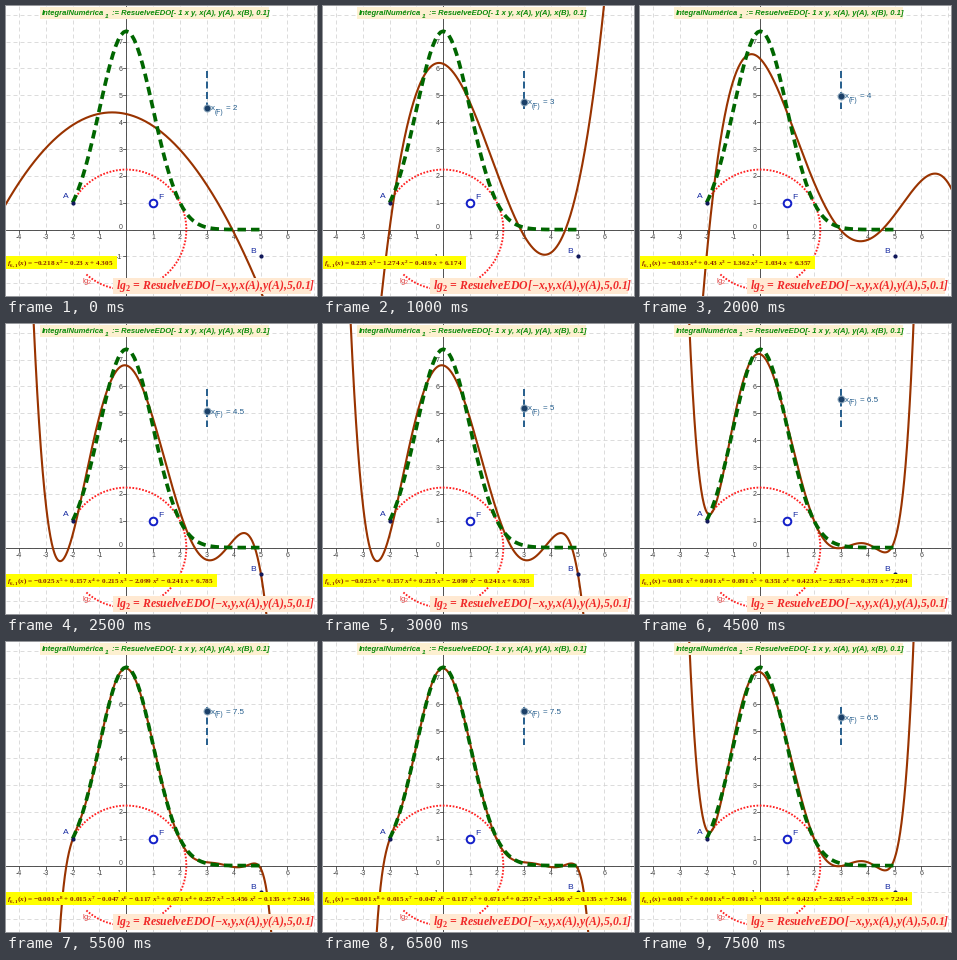
A matplotlib script for the animation above (8000 ms loop, 311 by 290 pixels).

```python
import numpy as np
import matplotlib.pyplot as plt
from matplotlib.animation import FuncAnimation
from matplotlib.patches import Rectangle

W, H, DPI = 311, 290, 100
OX, OY, UNIT = 120.3, 223.6, 26.85
STEP_MS, N_FRAMES = 500, 16

plt.rcParams.update({
    "font.family": "Liberation Sans",
    "mathtext.fontset": "custom",
    "mathtext.bf": "Liberation Serif:bold",
    "mathtext.bfit": "Liberation Serif:italic:bold",
    "lines.dash_capstyle": "butt",
    "lines.scale_dashes": False,
})


def pt(px):
    return px * 72 / DPI


def sx(x):
    return OX + UNIT * np.asarray(x)


def sy(y):
    return OY - UNIT * np.asarray(y)


def dashes(*lengths):
    return (0, tuple(pt(n) for n in lengths))


fig = plt.figure(figsize=(W / DPI, H / DPI), dpi=DPI, facecolor="white")
ax = fig.add_axes([0, 0, 1, 1])
ax.set_xlim(0, W)
ax.set_ylim(H, 0)
ax.axis("off")


def label(x, y, s, size, color, z=6, **kw):
    return ax.text(x, y, s, fontsize=pt(size), color=color, zorder=z,
                   va="baseline", **kw)


def line(x, y, color, width, z, **kw):
    return ax.plot(x, y, color=color, lw=pt(width), zorder=z, **kw)[0]


def dot(x, y, r, color, z=5):
    return ax.plot([x], [y], "o", ms=pt(2 * r), mfc=color, mec="none", zorder=z)[0]


def box(x0, y0, x1, y1, color, z):
    rect = Rectangle((x0, y0), x1 - x0, y1 - y0, fc=color, ec="none", zorder=z)
    return ax.add_patch(rect)


# Grid, axes and tick labels
GRID, AXIS = "#d4d4d4", "#444444"
for k in range(-4, 8):
    line([sx(k)] * 2, [0, H], GRID, 0.8, 0, ls=dashes(4, 3))
for k in range(-2, 9):
    line([0, W], [sy(k)] * 2, GRID, 0.8, 0, ls=dashes(4, 3))
line([0, W], [OY, OY], AXIS, 0.9, 1)
line([OX, OX], [0, H], AXIS, 0.9, 1)
for k in range(-4, 7):
    if k:
        line([sx(k)] * 2, [OY, OY + 3], AXIS, 0.8, 1)
        label(sx(k), OY + 9, str(k), 7, AXIS, 1, ha="center")
for k in range(-2, 8):
    if k:
        line([OX - 3, OX], [sy(k)] * 2, AXIS, 0.8, 1)
        label(OX - 4, sy(k) + 2.5, str(k), 7, AXIS, 1, ha="right")
label(OX - 4, OY - 1, "0", 7, AXIS, 1, ha="right")

# Solution of y' = -x y through A, and samples for the fit
nodes = np.linspace(-2, 5, 71)
bell = np.exp(2 - nodes**2 / 2)
line(sx(nodes), sy(bell), "#006600", 3.7, 4, ls=dashes(8.5, 5))

# Circular orbit from A, five radians clockwise
angle = np.arctan2(1, -2) - np.linspace(0, 5, 300)
line(sx(5**0.5 * np.cos(angle)), sy(5**0.5 * np.sin(angle)), "#ff2020", 1.9, 2,
     ls=dashes(1.7, 1.6))
label(75.5, 277, r"lg$_\mathdefault{2}$", 7.5, "#e04040")

# Points
BLUE = "#1428a0"
dot(sx(-2), sy(1), 2.1, "#10185a")
dot(sx(5), sy(-1), 2.1, "#10185a")
ax.plot([sx(1)], [sy(1)], "o", ms=pt(7.6), mfc="white", mec="#1420c8",
        mew=pt(2), zorder=5)
label(57, 192.5, "A", 8.5, BLUE)
label(152.5, 193, "F", 8.5, BLUE)
label(244.5, 247, "B", 8.5, BLUE)

# Captions
title_style = dict(color="#0a8a0a", z=8, weight="bold", style="italic")
box(34, 0.5, 263, 13, "#fdf0d0", 7)
label(36, 9, "IntegralNumérica", 7.6, **title_style)
label(99, 11.5, "1", 6.5, **title_style)
label(105.5, 9, ":= ResuelveEDO[- 1 x y, x(A), y(A), x(B), 0.1]", 7.6, **title_style)
box(107, 271.5, 305, 287.5, "#ffe9d2", 7)
label(109.5, 283, r"lg$_\mathbf{2}$ = ResuelveEDO[−x,y,x(A),y(A),5,0.1]",
      11.7, "#f02828", 8, family="Liberation Serif", weight="bold", style="italic")

# Slider
SLIDER = "#205a8a"
SLIDER_X = float(sx(3))
line([SLIDER_X] * 2, [65, 103], SLIDER, 1.9, 3, ls=dashes(7, 3.5))
halo = dot(SLIDER_X, 0, 4, "#8fa9bd")
knob = dot(SLIDER_X, 0, 2.9, "#1b4068")
name_text = label(204.5, 0, "x", 8, SLIDER)
sub_text = label(208.5, 0, "(F)", 6.8, SLIDER)
value_text = label(219.5, 0, "", 8, SLIDER)

# Polynomial fit
xs = np.linspace(-4.6, 7.2, 700)
fit_line = line([], [], "#993300", 2.1, 3)
formula = label(1, 259.3, "", 7.3, "#8b2500", 9, family="Liberation Serif",
                weight="bold")
formula_box = box(0, 250.3, 100, 263, "#ffff00", 8)


def number(c):
    return f"{c:.3f}".rstrip("0").rstrip(".")


def formula_string(coefs):
    out = r"$\mathbfit{f}_{\mathbf{6,1}}$($\mathbfit{x}$) ="
    top = len(coefs) - 1
    for i, c in enumerate(coefs):
        power = top - i
        sign = "−" if c < 0 else ("+" if i else "")
        gap = " " if i else ""
        out += f" {sign}{gap}{number(abs(c))}"
        if power > 1:
            out += rf" $\mathbfit{{x}}^\mathbf{{{power}}}$"
        elif power == 1:
            out += r" $\mathbfit{x}$"
    return out


def draw(i):
    value = 2 + 0.5 * i if i <= 12 else 14 - 0.5 * i
    degree = int(value + 0.5)
    coefs = np.polyfit(nodes, bell, degree)
    ys = np.polyval(coefs, xs)
    fit_line.set_data(sx(xs), np.clip(sy(ys), -200, H + 200))
    formula.set_text(formula_string(coefs))
    extent = formula.get_window_extent(fig.canvas.get_renderer())
    formula_box.set_width(extent.x1 * W / fig.bbox.width + 3)

    y = 102 - 6 * (value - 2)
    halo.set_ydata([y])
    knob.set_ydata([y])
    name_text.set_y(y + 2.5)
    sub_text.set_y(y + 5.5)
    value_text.set_y(y + 2.5)
    value_text.set_text(f"= {value:g}")
    return fit_line, formula, formula_box, halo, knob, name_text, sub_text, value_text


anim = FuncAnimation(fig, draw, frames=N_FRAMES, interval=STEP_MS,
                     repeat=True, repeat_delay=0, blit=False)
plt.show()
```
